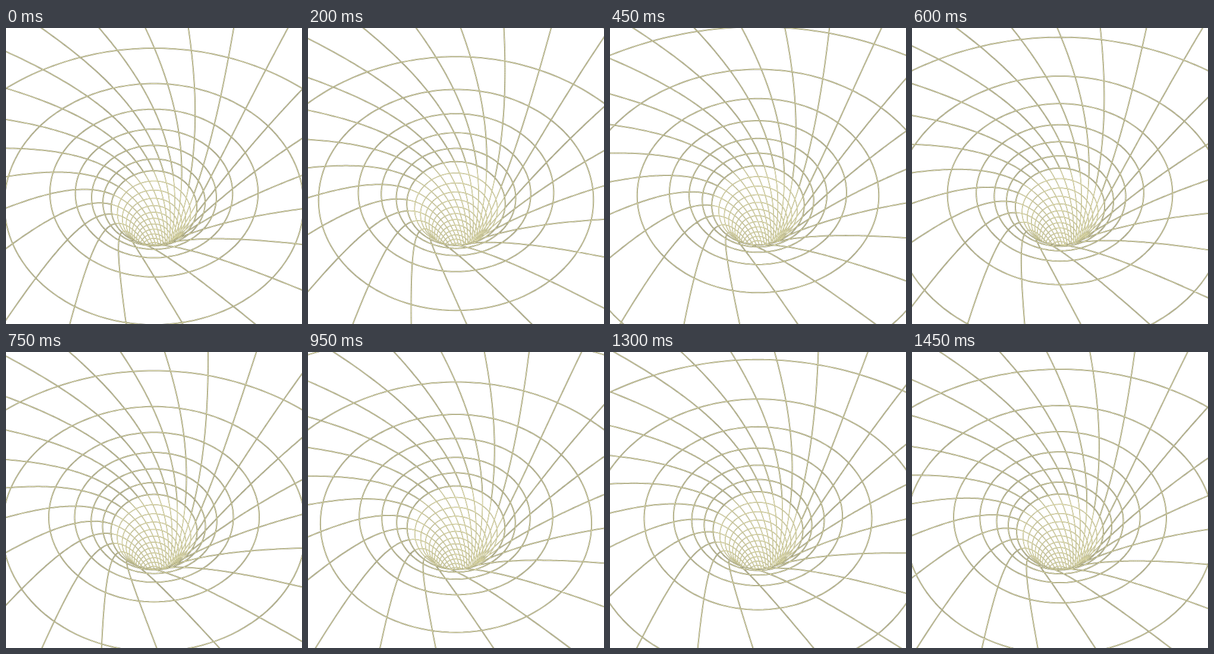
An HTML page with a canvas for the animation above (1500 ms loop, 498x498 px).

```html
<!DOCTYPE html>
<html>
<head>
<meta charset="utf-8">
<style>
html, body { margin: 0; width: 100%; height: 100%; overflow: hidden; background: #fff; }
canvas { display: block; width: 498px; height: 498px; }
</style>
</head>
<body>
<canvas id="stage" width="498" height="498"></canvas>
<script>
const ctx = document.getElementById('stage').getContext('2d');
const SIZE = 498, MID = 249, FOCAL = 412, DIST = 1000;
const SIN = 0.79, COS = 0.613;          // camera elevation
const SPOKES = 24, SPACING = 2 * Math.PI / SPOKES;
const STEP = 50, STEPS = 30;
const NEAR = -2.3, DEEP = 19;
const POLE = 3.11, FALL = 61;

// Horn: radius falls as 1/u while depth grows evenly with u
const radius = u => 1651 / (u + POLE);
const drop = u => FALL * u - 87;

function project(u, a) {
  const r = radius(u), h = drop(u), y = r * Math.sin(a);
  const z = DIST + y * COS + h * SIN;
  return {
    x: MID + FOCAL * r * Math.cos(a) / z,
    y: MID - FOCAL * (y * SIN - h * COS) / z,
    z
  };
}

// True where the inner side of the horn looks at the camera
function faces(u, a) {
  const r = radius(u), slope = r / (u + POLE) / FALL;
  return r + DIST * COS * Math.sin(a) + (DIST * SIN + drop(u)) * slope > 0;
}

function segment(u1, a1, u2, a2) {
  if (!faces((u1 + u2) / 2, (a1 + a2) / 2)) return;
  const p = project(u1, a1), q = project(u2, a2);
  if (p.z < 60 || q.z < 60) return;
  ctx.moveTo(p.x, p.y);
  ctx.lineTo(q.x, q.y);
}

function polyline(u1, a1, u2, a2, n) {
  const du = (u2 - u1) / n, da = (a2 - a1) / n;
  for (let i = 0; i < n; i++) {
    segment(u1 + du * i, a1 + da * i, u1 + du * (i + 1), a1 + da * (i + 1));
  }
}

// White skin of one band, so that the near lip hides what lies behind it
function cover(u1, u2) {
  const rows = 3, cols = 72, du = (u2 - u1) / rows, da = 2 * Math.PI / cols;
  ctx.beginPath();
  for (let i = 0; i < rows; i++) {
    for (let j = 0; j < cols; j++) {
      const u = u1 + du * i, a = da * j;
      if (!faces(u + du / 2, a + da / 2)) continue;
      [[u, a], [u + du, a], [u + du, a + da], [u, a + da]].forEach(([v, b], k) => {
        const p = project(v, b);
        k ? ctx.lineTo(p.x, p.y) : ctx.moveTo(p.x, p.y);
      });
      ctx.closePath();
    }
  }
  ctx.fillStyle = '#fff';
  ctx.fill();
}

function stroke(color, width) {
  ctx.strokeStyle = color;
  ctx.lineWidth = width;
  ctx.stroke();
}

function draw(phase) {
  const shift = phase - Math.floor(phase);
  const angle = (j, u) => Math.PI / 2 - (j + 0.49 * u + 0.52 + 1.5 * phase) * SPACING;
  ctx.fillStyle = '#fff';
  ctx.fillRect(0, 0, SIZE, SIZE);
  for (let n = DEEP; n > -4; n--) {
    const deep = n + shift, top = Math.max(deep - 1, NEAR);
    if (deep <= NEAR) break;
    if (top > 0) cover(top, deep);
    ctx.beginPath();
    polyline(deep, 0, deep, 2 * Math.PI, 168);
    for (let j = 0; j < SPOKES; j++) {
      polyline(top, angle(j, top), deep, angle(j, deep), n < 2 ? 16 : 6);
    }
    const far = deep > 5;
    stroke(far ? '#9a987a' : '#74735c', far ? 1.5 : 2);
    stroke('#f3efb4', far ? 0.9 : 1);
  }
}

let last = -1;
function tick() {
  const step = Math.floor(performance.now() / STEP) % STEPS;
  if (step !== last) {
    last = step;
    // the opening step closes the run, then the run restarts slightly behind
    draw(0.069 * (step || STEPS) - 0.08);
  }
  requestAnimationFrame(tick);
}
tick();
</script>
</body>
</html>
```
